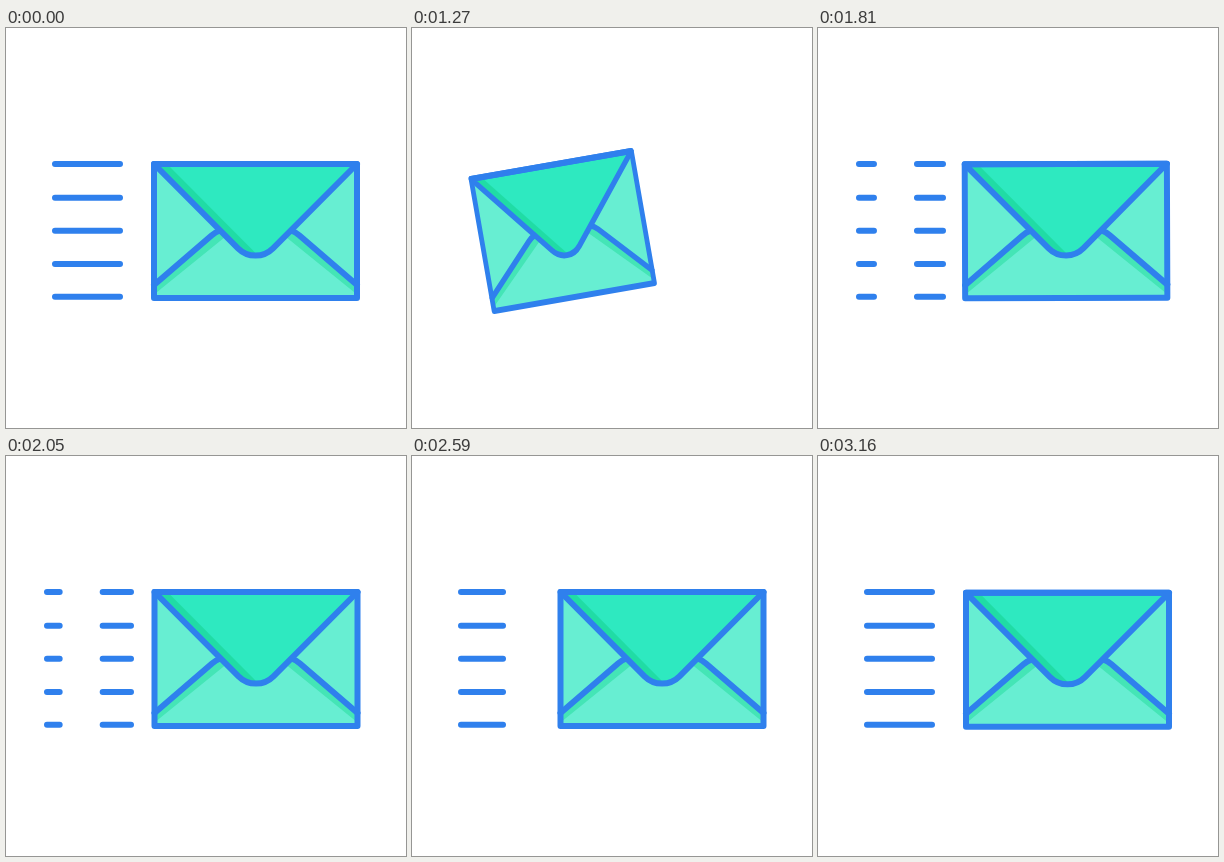
Animation of 400 by 400 pixels, one loop 3220 ms. Source, as an HTML page with a canvas:

```html
<!DOCTYPE html>
<html>
<head>
<meta charset="utf-8">
<style>
html, body { margin: 0; width: 100%; height: 100%; overflow: hidden; background: #fff; }
canvas { display: block; width: 400px; height: 400px; }
</style>
</head>
<body>
<canvas id="stage" width="400" height="400"></canvas>
<script>
const g = document.getElementById('stage').getContext('2d');
const LOOP = 3220, START = 1030, STEP = 30;
const BLUE = '#2f80ed', BODY = '#67eed2', FOLD = '#44e5b6', FLAP = '#2ee9c0', SHADE = '#20dca5';
const CX = 249.5, CY = 203;
const ROWS = [136, 169.8, 202.8, 236, 268.8];

// Dashes flow left between two edges, one after another.
const FLOW = { first: 1647, gap: 118.4, speed: 0.718, count: 11, left: 38, right: 128, len: 48 };

// How far the envelope is drawn back: 0 at rest, 1 fully wound up.
function pull(t) {
  if (t < START) return 0;
  if (t < 1300) return 1 - 0.605 * ((1300 - t) / 270) ** 2;
  if (t < 1455) return 1;
  if (t < 1845) return (1 + Math.cos(Math.PI * (t - 1455) / 390)) / 2;
  return 0;
}

function dash(x0, x1) {
  if (x1 - x0 < 6) return;
  g.beginPath();
  for (const y of ROWS) {
    g.moveTo(x0 + 3, y);
    g.lineTo(x1 - 3, y);
  }
  g.stroke();
}

function speedLines(t) {
  if (t < START) return dash(46, 117);
  if (t < FLOW.first) return dash(46, 87 - (t - START) * 0.9);
  for (let i = 0; i <= FLOW.count; i++) {
    const born = FLOW.first + i * FLOW.gap;
    if (t < born) break;
    const last = i === FLOW.count;
    let x = FLOW.right - (t - born) * FLOW.speed;
    if (last) x = Math.max(46, x);
    dash(Math.max(FLOW.left, x), Math.min(FLOW.right, x + (last ? 71 : FLOW.len)));
  }
}

function poly(color, ...pts) {
  g.beginPath();
  pts.forEach(([x, y]) => g.lineTo(x, y));
  g.closePath();
  g.fillStyle = color;
  g.fill();
}

// Lower fold on one side; s is -1 for left and 1 for right.
function fold(s) {
  const edge = () => {
    g.beginPath();
    g.moveTo(s * 101.5, 54);
    g.lineTo(s * 44, 4.5);
    g.quadraticCurveTo(s * 40, 1, s * 35.5, -0.5);
  };
  edge();
  g.lineTo(s * 28, 4);
  g.lineTo(s * 101.5, 63.5);
  g.closePath();
  g.fillStyle = FOLD;
  g.fill();
  edge();
  g.stroke();
}

function flapPath() {
  g.beginPath();
  g.moveTo(-101.5, -67);
  g.arcTo(0, 34.8, 101.5, -67, 24.7);
  g.lineTo(101.5, -67);
  g.closePath();
}

function envelope(t) {
  const p = pull(t);
  const n = Math.floor((t - START) / STEP);
  const shake = n < 0 ? [0, 0] : n % 2 ? [0, 0.8] : [0.5, 0];
  g.save();
  g.translate(CX - 100 * p + shake[0], CY + shake[1]);
  g.rotate(-10 * p * Math.PI / 180);
  g.scale(1 - 0.2 * p, 1);

  g.fillStyle = BODY;
  g.fillRect(-101.5, -67, 203, 134);
  fold(-1);
  fold(1);

  g.save();
  flapPath();
  g.clip();
  poly(SHADE, [-102, -67], [102, -67], [102, 40], [-102, 40]);
  poly(FLAP, [-88.5, -67], [5, 27], [10, 32], [102, -67]);
  g.restore();

  flapPath();
  g.stroke();
  g.strokeRect(-101.5, -67, 203, 134);
  g.restore();
}

function draw(now) {
  let t = now % LOOP;
  if (t >= START) t = Math.min(3160, START + Math.floor((t - START) / STEP) * STEP);
  g.fillStyle = '#fff';
  g.fillRect(0, 0, 400, 400);
  g.strokeStyle = BLUE;
  g.lineWidth = 6;
  g.lineCap = g.lineJoin = 'round';
  speedLines(t);
  envelope(t);
}

let begin;
function tick(now) {
  if (begin === undefined) begin = now;
  draw(now - begin);
  requestAnimationFrame(tick);
}
draw(0);
requestAnimationFrame(tick);
</script>
</body>
</html>
```
